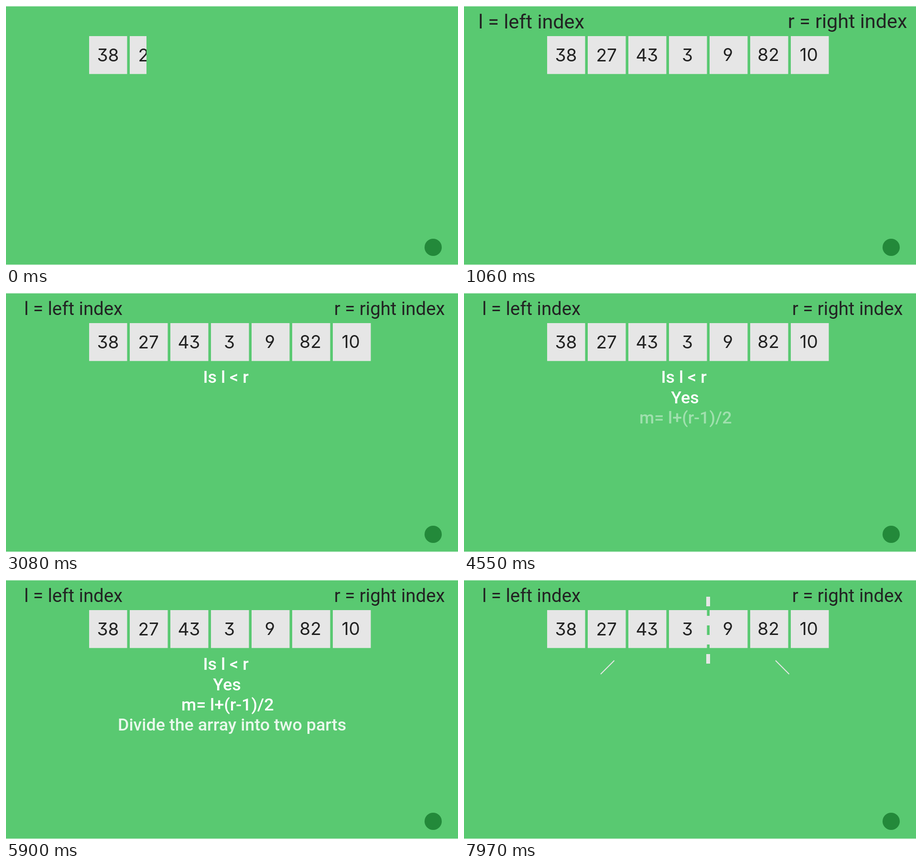
An HTML page that plays this animation: 946 by 542 pixels, repeating every 8 s.

```html
<!DOCTYPE html>
<html lang="en">
<head>
<meta charset="utf-8">
<title>Merge sort: dividing the array</title>
<style>
  html, body { margin: 0; width: 100%; height: 100%; overflow: hidden; background: #59c971; }
  svg { display: block; width: 100%; height: 100%; font-family: Roboto, sans-serif; }
  .cell { fill: #e6e6e6; }
  .number {
    font: 37px Inter, sans-serif; fill: #222; text-anchor: middle;
    font-feature-settings: "cv04", "cv09"; /* straight nine, flat-top three */
  }
  .label { font-size: 38.4px; fill: #222; }
  .step { font-size: 35.8px; font-weight: 500; fill: #fff; }
  .line { stroke: #e6e6e6; fill: none; }
</style>
</head>
<body>
<svg viewBox="0 0 946 542">
  <clipPath id="reveal"><rect id="wipe" y="60" height="86"/></clipPath>
  <rect width="946" height="542" fill="#59c971"/>
  <path d="M0 .5H946M0 541.5H946" stroke="#fff" stroke-opacity=".8"/>
  <circle cx="894" cy="505" r="18" fill="#23893a"/>
  <g id="cells" clip-path="url(#reveal)"></g>
  <text class="label" x="38" y="45.5" data-cx="142" data-cy="32">l = left index</text>
  <text class="label" x="686.7" y="45.5" data-cx="803" data-cy="35">r = right index</text>
  <g id="steps">
    <text class="step" x="412.5" y="188" data-from="1920" data-to="2340">Is l &lt; r</text>
    <text class="step" x="433.3" y="230.5" data-from="3080" data-to="3600">Yes</text>
    <text class="step" x="367" y="272.5" data-from="4400" data-to="4750">m= l+(r-1)/2</text>
    <text class="step" x="234" y="315" data-from="5570" data-to="5950">Divide the array into two parts</text>
  </g>
  <path id="divider" class="line" stroke-width="8" stroke-dasharray="20"/>
  <path id="branches" class="line" stroke-width="2"/>
</svg>
<script>
const LOOP = 8000;
const byId = id => document.getElementById(id);
const labels = document.querySelectorAll('.label');
const steps = document.querySelectorAll('.step');

// The row of numbers is set slightly tighter than the cells and rises a little.
byId('cells').innerHTML = [38, 27, 43, 3, 9, 82, 10].map((value, i) =>
  `<rect class="cell" x="${174 + 85 * i}" y="63" width="79.5" height="79.3"/>
   <text class="number" x="${213.5 + 84.7 * i}" y="${116 - 0.15 * i}">${value}</text>`
).join('');

const progress = (t, from, to) => Math.min(1, Math.max(0, (t - from) / (to - from)));
const backOut = p => 1 + 2.7 * (p - 1) ** 3 + 1.7 * (p - 1) ** 2;
const show = (el, visible) => el.setAttribute('visibility', visible ? 'visible' : 'hidden');

function draw(t) {
  const wipeStep = Math.min(8, Math.floor(t / 54 + 0.08));
  byId('wipe').setAttribute('width', 294 + 58.75 * wipeStep);

  const scale = backOut(progress(t, 770, 1180));
  for (const label of labels) {
    const { cx, cy } = label.dataset;
    show(label, t >= 810);
    label.setAttribute('transform',
      `translate(${cx} ${cy}) scale(${scale}) translate(${-cx} ${-cy})`);
  }

  for (const step of steps) {
    step.setAttribute('opacity', progress(t, +step.dataset.from, +step.dataset.to));
  }
  byId('steps').setAttribute('opacity', 1 - progress(t, 6690, 6960));

  const divider = byId('divider');
  show(divider, t >= 7160);
  divider.setAttribute('d', `M511 35V${35 + 140 * progress(t, 7130, 7450)}`);

  const branches = byId('branches');
  const reach = 28.5 * progress(t, 7870, 7970);
  show(branches, t >= 7920);
  branches.setAttribute('d',
    `M314.5 168.5l${-reach} ${reach}M652 168.5l${reach} ${reach}`);
}

function frame() {
  draw(performance.now() % LOOP);
  requestAnimationFrame(frame);
}
frame();
</script>
</body>
</html>
```
